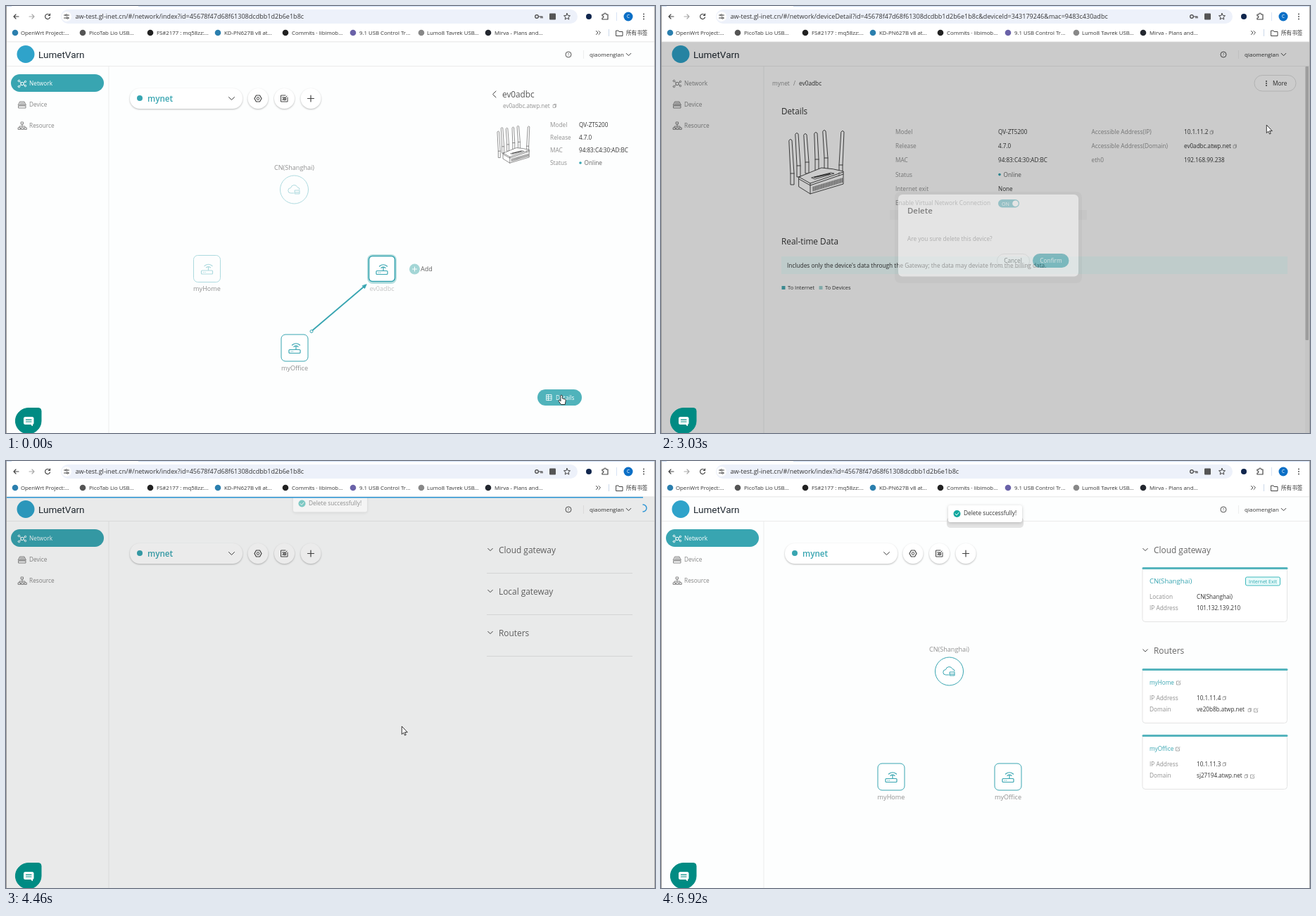
Animation of 922 by 607 pixels, one loop 7.02 s. Source, as an HTML page:

```html
<!DOCTYPE html>
<html lang="en">
<head>
<meta charset="utf-8">
<title>Device removal</title>
<style>
html, body { margin: 0; width: 100%; height: 100%; overflow: hidden; background: #fff; }
svg { display: block; width: 922px; height: 607px; font-family: "Open Sans", "Noto Sans CJK SC", sans-serif; }
.raised { filter: drop-shadow(0 1.5px 1.2px #0004); }
.floating { filter: drop-shadow(0 1px 2px #0003); }
</style>
</head>
<body>
<svg id="stage" viewBox="0 0 922 607"></svg>
<script>
const TEAL = '#38a5b1', DARK = '#333', GRAY = '#909090', LOOP = 7020;

// Drawing helpers; text is placed by the middle of its x-height
const text = (x, y, s, size = 8.3, fill = DARK, more = '') =>
  `<text x="${x}" y="${y + size * .36}" font-size="${size}" fill="${fill}" ${more}>${s}</text>`;
const mid = 'text-anchor="middle"', semi = 'font-weight="600"';
const rect = (x, y, w, h, fill, r = 0, more = '') =>
  `<rect x="${x}" y="${y}" width="${w}" height="${h}" rx="${r}" fill="${fill}" ${more}/>`;
const circle = (x, y, r, fill, more = '') => `<circle cx="${x}" cy="${y}" r="${r}" fill="${fill}" ${more}/>`;
const path = (d, stroke = '#444', width = 1, fill = 'none') =>
  `<path d="${d}" fill="${fill}" stroke="${stroke}" stroke-width="${width}" stroke-linecap="round" stroke-linejoin="round"/>`;
const group = (id, ...parts) => `<g id="${id}">${parts.join('')}</g>`;
const outline = (color, width = 1) => `stroke="${color}" stroke-width="${width}"`;

const chevron = (x, y, s = 4) => path(`M${x - s} ${y - s / 2}l${s} ${s} ${s} ${-s}`);
const copyIcon = (x, y) => path(`M${x - .5} ${y - 2.5}h3v4h-1M${x - 1.5} ${y - 1.500}h3v4h-3z`, '#888', .6);
const editIcon = (x, y) => path(`M${x + 1} ${y - 2}h-3.5v5h5v-3M${x} ${y + 1}l3 -3.5`, '#888', .7);
const routerIcon = (x, y) =>
  path(`M${x - 8} ${y + 3.5}q0 -1 1 -1h14q1 0 1 1v3q0 1 -1 1h-14q-1 0 -1 -1z` +
    `M${x - 5} ${y + 5}h.3m2 0h.3M${x + 2} ${y + 2}v-4M${x - 3.5} ${y - 4}q5.500 -4.500 11 0M${x - 1} ${y - 1.700}q3 -2.500 6 0`, TEAL, 1.2);
const cloudIcon = (x, y) =>
  path(`M${x - 1} ${y + 5}h-4a3.700 3.700 0 0 1 0 -7.400a5 5 0 0 1 9.500 -1q3 .4 3 3M${x + 1} ${y + 1}h6.500v5h-6.500zM${x + 1} ${y + 4}h6`, TEAL, 1);
const node = (x, y, name, opacity = 1) => `<g opacity="${opacity}">` +
  rect(x - 19, y - 19, 38, 38, '#fff', 6, outline(TEAL)) + routerIcon(x, y) + '</g>' +
  text(x, y + 28.5, name, 9.1, GRAY, mid);
const hub = (x, y, opacity = 1) => text(x, y - 31, 'CN(Shanghai)', 9.1, GRAY, mid) +
  `<g opacity="${opacity}">${circle(x, y, 20, '#fff', outline(TEAL))}${cloudIcon(x, y)}</g>`;

// Rows of label and value
const rows = (x, xv, y, gap, pairs) => pairs.map(([label, value], i) =>
  text(x, y + i * gap, label, 8.3, GRAY) + text(xv, y + i * gap, value, 8.15)).join('');
const online = (x, y) => circle(x + 2, y, 1.8, TEAL) + text(x + 7.5, y, 'Online', 8.3, '#666');

function device() {
  const antennas = [[184, 190, 186, 254], [193, 181, 195, 243], [205, 182, 207, 238],
    [220, 180, 221, 234], [232, 177, 234, 232], [258, 178, 255, 242]];
  let sleeves = '', vents = '';
  for (const [x, y, bx, by] of antennas)
    sleeves += `M${x - 2} ${y + 1}q2 -3 4 0L${bx + 3} ${by - 16}V${by}h-5v-16zM${bx - 2} ${by - 16}h5`;
  for (let x = 216; x < 258; x += 1.8) vents += `M${x} ${264 - (x - 213) * .3}v-6`;
  return path(sleeves, DARK, .9, '#fff') +
    path('M196 243L228 230Q245 231 259 235V253L212 267 196 257ZM196 243L212 252 259 236M196 246L212 255 259 239M212 252V267', DARK, .9, '#fff') +
    path('M214 244l27 -7 5 1 -27 8z', DARK, .8) + path('M218 243.500l22 -5', DARK, 1.6) + path(vents, DARK, .8);
}

const browserBar = () => {
  const marks = [[13, 21, 'OpenWrt Project:...', '#2b7fae'], [109, 118, 'PicoTab Lio USB...', '#555'],
    [205, 214, 'FS#2177 : mq58zz:...', '#222'], [301, 310, 'KD-PN627B v8 at...', '#2b7fae'],
    [397, 406, 'Commits · libimob...', '#222'], [493, 502, '9.1 USB Control Tr...', '#6a62a8'],
    [590, 598, 'Lumo8 Tavrek USB...', '#888'], [685, 694, 'Mirva - Plans and...', '#23272f']];
  return rect(0, 0, 922, 51, '#fff') + rect(0, 0, 8, 1, '#cfdff5') + rect(188, 0, 734, 1, '#cfdff5') +
    path('M18 15h-7m3 -3l-3 3 3 3', '#444', 1.2) + path('M33 15h7m-3 -3l3 3 -3 3', '#aaa', 1.2) +
    path('M62 13a3.500 3.500 0 1 0 .5 3M62.500 11v2.500h-2.500', '#444', 1.2) +
    rect(78, 5, 734, 20, '#edf1fa', 10) + circle(86, 15, 7, '#fff') +
    path('M82.500 13h2m3 0h2M82.500 17h3m3 0h1', '#444', 1.1) +
    circle(85.7, 13, 1.2, 'none', outline('#444')) + circle(87.2, 17, 1.2, 'none', outline('#444')) +
    '<text id="url" x="98.5" y="18" font-size="9.05" fill="#333"></text>' +
    circle(754, 15, 2.3, 'none', outline('#444', 1.2)) + path('M757 15h5v2m-2 -2v2', '#444', 1.2) +
    rect(772, 10.5, 9, 9, '#555', 1) +
    path('M797 10.500l1.300 3 3.200 .3 -2.400 2.100 .7 3.200 -2.800 -1.700 -2.800 1.700 .7 -3.200 -2.400 -2.100 3.200 -.3z') +
    circle(828, 15, 4, '#10264d') +
    path('M847 12h2.500q0 -2 1.500 -2t1.500 2h2.500v7h-8v-2q2 0 2 -1.500t-2 -1.500z', '#444', 1.2) +
    rect(867, 9, 1, 12, '#d8e3f5') + circle(884, 15, 6.5, '#0b6fc6') + text(884, 15, 'C', 6.5, '#fff', mid) +
    [11.5, 15, 18.5].map(y => circle(906, y, .9, '#444')).join('') +
    marks.map(([x, tx, s, color]) => circle(x, 38, 4.3, color) + text(tx, 38, s, 7.8)).join('') +
    path('M838.500 35.500l2.500 2.500 -2.500 2.500m3.500 -5l2.500 2.500 -2.500 2.500') + rect(856, 33, 1, 10, '#ccd8ea') +
    path('M867 35h3l1 1.500h5v6h-9z') + text(881, 38, '所有书签', 7.6) + rect(0, 50.5, 922, .8, '#ddd');
};

const frameChrome = () => circle(28, 68.5, 12.5, '#2fa3ca') +
  text(46, 69.5, 'LumetVarn', 13.5, '#222b33', 'style="font-family:Roboto,sans-serif"') +
  circle(799, 69, 4, 'none', outline('#555')) + text(799, 69, '?', 6, '#555', mid) + rect(820, 63, 1, 12, '#eee') +
  text(829, 69, 'qiaomenglan', 8) + chevron(884.5, 69, 3.3) +
  rect(0, 85, 922, 1, '#ebebeb') + rect(145.5, 86, 1, 521, '#ebebeb');

const sideItem = (y, name, color, icon) => path(icon, color, 1) + text(33, y, name, 8.3, color);
const ring = (x, y, r) => `M${x - r} ${y}a${r} ${r} 0 1 0 ${2 * r} 0a${r} ${r} 0 1 0 ${-2 * r} 0`;
const netIcon = ring(23, 110.5, 2.2) + ring(18.5, 106.5, 1.3) + ring(18.5, 114.5, 1.3) + ring(27.5, 107.5, 1.2) +
  ring(27.5, 113.5, 1.2) + 'M19.500 107.500l2 1.500m-2 4.500l2 -1.500m3.500 -2.500l1.500 -1m-1.500 3l1.500 1';
const sidebar = () => sideItem(140, 'Device', '#858585', 'M20 136h6l2.500 5h-11zM18 142h10v3h-10zM20 138h6M19 140h8') +
  sideItem(170, 'Resource', '#858585', 'M21.500 165h3v3h-3zM23 168v3M19 173v-2h8v2M17.500 173h3v2.500h-3zM22 173h3v2.500h-3zM26.300 173h3v2.500h-3z') +
  group('sideOff', sideItem(110, 'Network', '#858585', netIcon)) +
  group('sideOn', rect(7, 97, 132, 25, TEAL, 12.5), sideItem(110, 'Network', '#fff', netIcon));

const netTools = () => `<g class="raised">${rect(176, 117, 160, 29, '#fff', 14)}` +
  [358, 395.5, 433].map(x => circle(x, 131.5, 14.5, '#fff')).join('') + '</g>' +
  circle(190, 131, 4, TEAL) + text(201, 131.5, 'mynet', 11.7, TEAL, semi) + chevron(320.5, 131.5) +
  circle(358, 131.5, 1.8, 'none', outline('#444')) + path('M353 131.500l2.500 -4.500h5l2.500 4.500 -2.500 4.500h-5z', '#444', 1.2) +
  path('M397 127h-6.500v9h9.500v-6M392.500 130h3m-3 3h5m-2 -1l3.500 -4') + circle(396, 132, 1.8, 'none', outline('#444')) +
  path('M428.500 131.500h9m-4.500 -4.500v9', '#444', 1.2);

const selected = () => hub(409.5, 261, .4) + node(285.5, 373.5, 'myHome', .4) + node(410, 486, 'myOffice') +
  rect(513, 353, 42, 42, '#b9e0e0', 8) + rect(515.5, 355.5, 37, 36, '#fff', 5, outline(TEAL, 1.6)) + routerIcon(534, 374) +
  text(534, 401.5, 'ev0adbc', 9.1, '#c4c4c4', mid) +
  path('M435.500 461L509 398.500', TEAL, 1.8) + path('M512 396l-2.500 5.500 -3 -3.500z', TEAL, 1, TEAL) +
  circle(434, 462.5, 2, '#fff', outline(TEAL)) +
  circle(580.5, 374, 7.5, '#a4d6d6') + path('M577.500 374h6m-3 -3v6', '#fff') + text(589, 374, 'Add', 9.1, '#666') +
  path('M696 121l-4.500 4.500 4.500 4.500') + text(705, 126, 'ev0adbc', 11.8, '#555') +
  text(706, 142, 'ev0adbc.atwp.net', 8.1, GRAY) + copyIcon(779, 142) +
  `<g transform="translate(591.700 67) scale(.585)">${device()}</g>` +
  rows(773, 814, 169, 18, [['Model', 'QV-ZT5200'], ['Release', '4.7.0'], ['MAC', '94:83:C4:30:AD:BC'], ['Status', '']]) +
  online(814, 223) + rect(755, 545, 63, 23, '#50b3bb', 11.5) +
  path('M768 552.500h7v8h-7zM768 555.200h7m-7 2.600h7m-4.500 -5v8', '#fff', .8) + text(781, 557, 'Details', 8.3, '#fff');

const section = (y, name) => chevron(688, y - .5, 3.3) + text(700, y, name, 11.9, '#666');
const loadingList = () => ['Cloud gateway', 'Local gateway', 'Routers'].map((name, i) =>
  section(126.5 + i * 59, name) + rect(683, 159 + i * 59, 207, 1, '#e6e6e6')).join('');
const card = (y, title, pairs, size = 8.2) => rect(684, y + 1, 205.5, 76.5, '#fff', 4, outline('#e4e4e4')) +
  path(`M685 ${y + 1.500}H889`, '#55b4bd', 3) + text(694, y + 20, title, size, TEAL) +
  rows(694, 761, y + 42, 16.4, pairs);
const routerCard = (y, title, ip, domain, end, titleEnd) =>
  card(y, title, [['IP Address', ip], ['Domain', domain]]) + editIcon(titleEnd, y + 20) +
  copyIcon(800, y + 42) + copyIcon(end, y + 59) + editIcon(end + 9, y + 59);
const fullList = () => section(126.5, 'Cloud gateway') +
  card(151, 'CN(Shanghai)', [['Location', 'CN(Shanghai)'], ['IP Address', '101.132.139.210']], 9.6) +
  rect(830.5, 165, 49, 12, '#e6fafa', 2, outline('#3fb9bd')) + text(855, 171, 'Internet Exit', 7, '#2fa9b0', mid) +
  section(270, 'Routers') + routerCard(295, 'myHome', '10.1.11.4', 've20b8b.atwp.net', 836, 735) +
  routerCard(389, 'myOffice', '10.1.11.3', 'sj27194.atwp.net', 831, 734) +
  hub(409.5, 299) + node(327, 449, 'myHome') + node(493, 449, 'myOffice');

const detail = () => text(158, 110, 'mynet', 8.4, GRAY) + text(188, 110, '/', 8.4, GRAY) + text(196, 110, 'ev0adbc', 8.3) +
  rect(843, 98.5, 59, 22.5, '#fff', 11.2, outline('#dedede')) +
  [107, 110, 113].map(y => circle(860, y, .9, DARK)).join('') + text(869, 110, 'More', 8.4, DARK) +
  text(171, 150, 'Details', 11.7) + device() +
  rows(333, 479, 179, 20.2, [['Model', 'QV-ZT5200'], ['Release', '4.7.0'], ['MAC', '94:83:C4:30:AD:BC'], ['Status', ''],
    ['Internet exit', 'None'], ['Enable Virtual Network Connection', '']]) +
  online(479, 239.6) + rect(479, 275, 30, 11.5, TEAL, 5.7) + text(484, 281, 'ON', 7.2, '#fff') + circle(503.5, 280.7, 4.3, '#fff') +
  rows(611.5, 743, 179, 20.2, [['Accessible Address(IP)', '10.1.11.2'], ['Accessible Address(Domain)', 'ev0adbc.atwp.net'],
    ['eth0', '192.168.99.238']]) + copyIcon(782, 179.5) + copyIcon(815, 199.5) +
  text(171, 335, 'Real-time Data', 11.8) + '<rect id="notice" y="356" height="25" fill="#effffe"/>' +
  text(179, 369, "Includes only the device's data through the Gateway; the data may deviate from the billing data.") +
  rect(171.5, 398, 5, 5, '#48abb4') + text(180, 400, 'To Internet', 7.5) +
  rect(224.5, 398, 5, 5, '#a1d4d3') + text(233, 400, 'To Devices', 7.5) +
  rect(915, 86, 6, 521, '#f6f6f6') + rect(915.5, 86, 4.5, 389, '#c4c4c4', 1);

const tooltip = () => rect(807, 549, 75, 70, '#fff', 3, 'class="floating"') + text(814, 562, 'Total 0.00 MB', 9, '#555', semi) +
  text(814, 575.5, '17:32 - 17:33', 7.9, GRAY) + rect(814, 586, 6, 6, '#48abb4') + text(825, 589, '0 MB', 9, '#666') +
  rect(814, 599, 6, 6, '#a1d4d3') + text(825, 602, '0 MB', 9, '#666');

const dialog = () => rect(332, 272, 266, 130, '#0000000f', 8) + rect(325, 298, 280, 14, '#0000000d') +
  rect(337, 276, 256, 116.5, '#fdfdfd', 6) + text(350, 298.5, 'Delete', 11.4, DARK, semi) +
  text(350, 339, 'Are you sure delete this device?', 8.25, GRAY) +
  rect(477.5, 360.5, 46, 19.5, '#fff', 9.7, outline('#e0e0e0')) + text(500, 370.5, 'Cancel', 8.3, '#555', mid) +
  rect(528, 360, 51.5, 20, TEAL, 10) + text(554, 370.5, 'Confirm', 8.3, '#fff', mid);

const toast = () => group('toastShadow', rect(406, 80, 109, 15, '#e3e3e3', 5)) +
  rect(408, 63, 105, 24, '#fff', 3, 'class="floating"') +
  circle(420.5, 75, 5, '#14a9a0') + path('M418 75l2 2 3 -3.500', '#fff') + text(430, 74.5, 'Delete successfully!');

document.getElementById('stage').innerHTML = rect(0, 0, 922, 607, '#fdfefe') +
  frameChrome() + sidebar() + group('network', netTools()) + group('selected', selected()) +
  group('loadingList', loadingList()) + group('fullList', fullList()) + group('detail', detail()) +
  group('tooltip', tooltip()) +
  group('menu', rect(837, 124, 66, 57, '#fff', 6, 'class="floating"'), group('hover', rect(844, 152, 51, 22.5, '#f5f5f5', 3)),
    text(851, 141, 'Rename'), text(851, 163.5, 'Delete')) +
  group('shade', rect(0, 51, 922, 556, '#000')) + group('dialog', dialog()) + group('toast', toast()) + browserBar() +
  group('progress', '<rect id="bar" y="51" height="1.5" fill="#2a94d4"/>', path('M905 62a5 5 0 0 1 0 10', '#2a94d4', 1.4)) +
  path('M31.500 571.500H46Q50 571.500 50 575.500V590A18.300 18.300 0 1 1 31.500 571.500Z', '#008b83', 1, '#008b83') +
  rect(25, 584, 14.5, 11, '#fff', 2.5) + path('M35 594l2.500 3v-3', '#fff', 1, '#fff') + path('M28.500 588.200h7.500m-7.500 2.800h7.500', '#008b83', 1.2) +
  rect(0, 0, 1, 607, '#999') + rect(921, 0, 1, 607, '#aaa') +
  group('arrow', path('M.3 -.5v11l2.500 -2.300 1.800 3.800 1.700 -.8 -1.800 -3.600h3.400z', '#222', .9, '#fff')) +
  group('hand', path('M-1.200 .8q1.200 -1.600 2.400 0v4l4 1.200q1.300 .5 1 2l-1 5.500h-5.700l-3.500 -5q0 -1.500 1.500 -1l1.300 1z', '#222', .9, '#fff'));

// Stepped tracks: each row is [start time, ...values]
const pointerTrack = [[0, 789, 553, 1], [150, 795, 550, 1], [700, 796, 530, 0], [850, 800, 470, 0], [980, 802, 398, 0],
  [1130, 806, 335, 0], [1280, 826, 230, 0], [1420, 850, 160, 0], [1570, 860, 114, 0], [1720, 865, 112, 1],
  [2180, 866, 120, 1], [2320, 867, 138, 1], [2460, 866, 152, 1], [2610, 866, 160, 1], [2750, 865, 164, 1],
  [3030, 860, 170, 0], [3310, 780, 215, 0], [3450, 660, 290, 0], [3590, 580, 345, 0], [3740, 556, 365, 1],
  [3880, 553, 368, 1], [4310, 556, 372, 0], [4460, 562, 378, 0], [4590, 568, 378, 0], [4740, 572, 377, 0],
  [5170, 574, 366, 0], [5320, 573, 350, 0], [5480, 570, 335, 0], [6070, 640, 400, 0], [6210, 750, 490, 0], [6360, 836, 570, 0]];
const shadeTrack = [[0, 0], [3030, .2], [3180, .45], [3310, .5], [4160, .38], [4310, .22], [4460, .08], [4590, 0]];
const dialogTrack = [[0, 0, 0], [3030, .5, -8], [3180, 1, 0], [4160, .6, -5], [4310, 0, 0]];
const toastTrack = [[0, 0, 0], [4460, .5, -14.5], [4590, .9, -4], [4740, 1, 0]];
const barTrack = [[0, 0], [550, 300], [700, 620], [850, 905], [980, 0], [4310, 500], [4460, 905], [4590, 0]];
const at = (track, t) => track.findLast(row => row[0] <= t).slice(1);

const $ = id => document.getElementById(id);
const show = (id, opacity, x = 0, y = 0) => {
  $(id).style.display = opacity ? '' : 'none';
  $(id).setAttribute('opacity', +opacity);
  $(id).setAttribute('transform', `translate(${x} ${y})`);
};

function draw(t) {
  const within = (a, b) => t >= a && t < b;
  const onDetail = within(700, 4310);
  $('url').textContent = 'aw-test.gl-inet.cn/#/network/' + (within(550, 4310) ? 'deviceDetail' : 'index') +
    '?id=45678f47d68f61308dcdbb1d2b6e1b8c' + (within(550, 4310) ? '&deviceId=343179246&mac=9483c430adbc' : '');
  show('sideOn', !onDetail);
  show('sideOff', onDetail);
  show('network', !onDetail);
  show('selected', t < 700);
  show('detail', onDetail);
  show('loadingList', within(4310, 4590));
  show('fullList', t >= 4590);
  show('tooltip', within(850, 1130));
  show('menu', within(2030, 2180) ? .6 : within(2180, 3030));
  show('hover', t >= 2460);
  $('notice').setAttribute('x', t < 3030 ? 725 : 171);
  $('notice').setAttribute('width', t < 1280 ? 0 : t < 3030 ? 120 : 719);
  show('shade', at(shadeTrack, t)[0]);
  for (const [id, track] of [['dialog', dialogTrack], ['toast', toastTrack]]) {
    const [opacity, dy] = at(track, t);
    show(id, opacity, 0, dy);
  }
  show('toastShadow', t >= 4740);
  const [bar] = at(barTrack, t), [x, y, hand] = at(pointerTrack, t);
  show('progress', bar > 0);
  $('bar').setAttribute('width', bar);
  show('arrow', !hand && t < 6920, x, y);
  show('hand', hand, x, y);
}

const start = performance.now();
function tick() {
  draw((performance.now() - start) % LOOP);
  requestAnimationFrame(tick);
}
tick();
</script>
</body>
</html>
```
